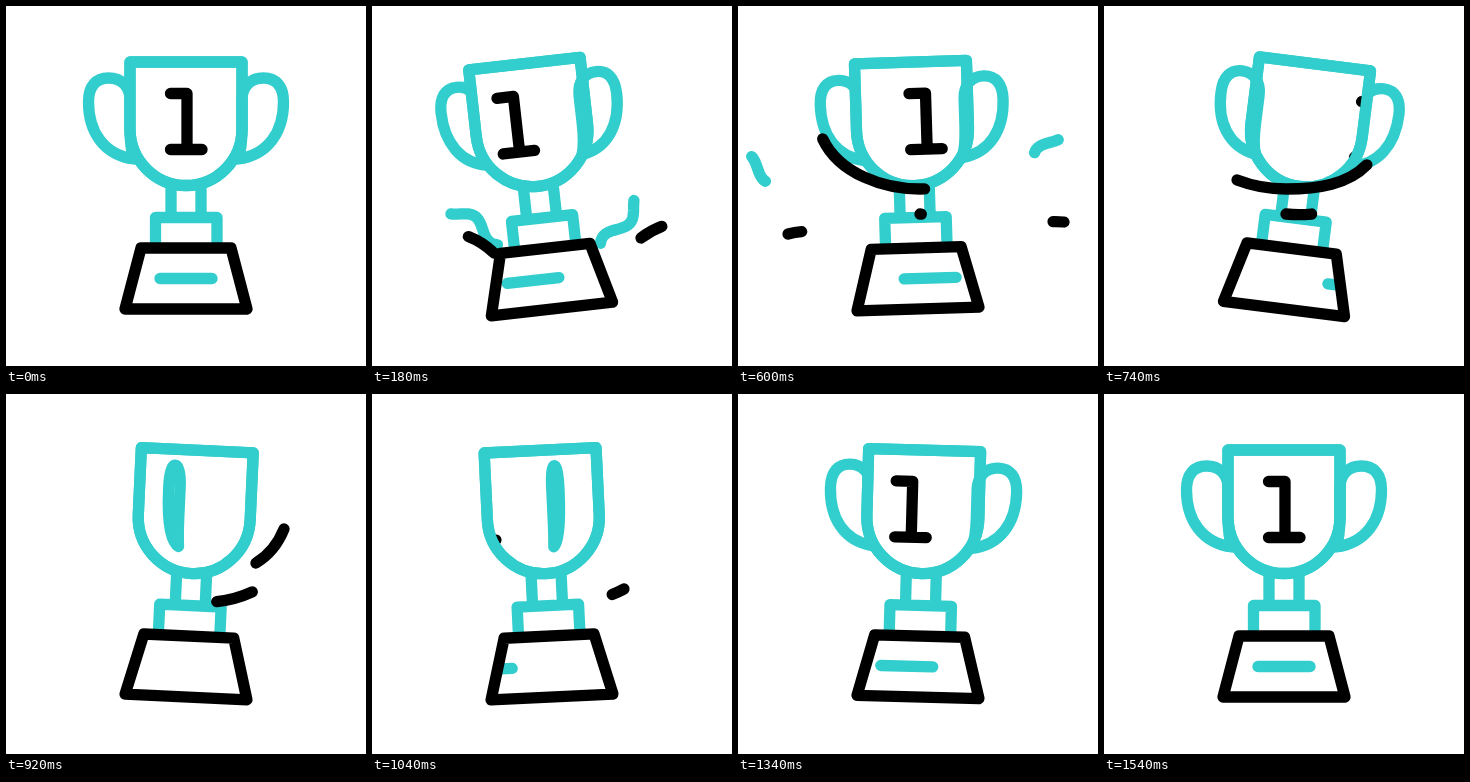
An HTML page that plays this animation: 360 px wide and 360 px high, repeating every 2.4 s.

```html
<!DOCTYPE html>
<html lang="en">
<head>
<meta charset="utf-8">
<title>Spinning trophy</title>
<style>
  html, body { margin: 0; width: 100%; height: 100%; overflow: hidden; background: #fff; }
  svg { display: block; width: 100vw; height: 100vh; }
  path { fill: none; stroke-width: 11.3; stroke-linecap: round; stroke-linejoin: round; }
  .teal { stroke: #32cdcd; }
  .black { stroke: #000; }
  .solid { fill: #fff; }
  .handle { vector-effect: non-scaling-stroke; }
</style>
</head>
<body>
<svg viewBox="0 0 360 360">
  <defs>
    <clipPath id="cupClip"><path d="M124 56H236V123A56 56.5 0 0 1 124 123Z"/></clipPath>
    <clipPath id="baseClip"><path d="M135 242H225L241 303H119Z"/></clipPath>
  </defs>
  <g id="sparks"></g>
  <g id="trophy">
    <g id="back"></g>
    <path class="teal" d="M165 180V211M195 180V211M149.5 240V211.5H211V240"/>
    <path class="teal solid" d="M124 56H236V123A56 56.5 0 0 1 124 123Z"/>
    <g clip-path="url(#cupClip)">
      <path id="digit" class="black" d="M164.5 87.5H181V143.5M164.5 143.5H196"/>
    </g>
    <path class="teal" d="M124 56H236V123A56 56.5 0 0 1 124 123Z"/>
    <g id="front"></g>
    <path class="solid" d="M135 242H225L241 303H119Z"/>
    <g clip-path="url(#baseClip)">
      <path id="label" class="teal" d="M154 272.5H206"/>
    </g>
    <path class="black" d="M135 242H225L241 303H119Z"/>
  </g>
  <g id="trails"></g>
</svg>
<script>
const LOOP = 2400, STEP = 20;
const $ = id => document.getElementById(id);

function addPath(parent, cls, d) {
  const el = document.createElementNS('http://www.w3.org/2000/svg', 'path');
  el.setAttribute('class', cls);
  el.setAttribute('d', d);
  parent.appendChild(el);
  return el;
}

// Eased track through [time, value] keys: flat at the ends and turning points
function track(...keys) {
  const last = keys.length - 1;
  const slope = i => (keys[i + 1][1] - keys[i][1]) / (keys[i + 1][0] - keys[i][0]);
  const tan = keys.map((_, i) => {
    if (i === 0 || i === last) return 0;
    const a = slope(i - 1), b = slope(i);
    return a * b <= 0 ? 0 : 2 * a * b / (a + b);
  });
  return t => {
    if (t <= keys[0][0]) return keys[0][1];
    if (t >= keys[last][0]) return keys[last][1];
    const i = keys.findIndex(k => k[0] > t) - 1;
    const [t0, v0] = keys[i], [t1, v1] = keys[i + 1];
    const h = t1 - t0, u = (t - t0) / h, w = 1 - u;
    return v0 * (1 + 2 * u) * w * w + v1 * u * u * (3 - 2 * u)
      + h * u * w * (tan[i] * w - tan[i + 1] * u);
  };
}

// Wind up, hold briefly, then swing back and spin half a turn
const tilt = track([0, 0], [350, -12.3], [420, -12.3], [765, 7.5], [1110, -4], [1250, 2], [1540, 0]);
const spin = track([0, 0], [350, -48], [420, -48], [920, 74], [1540, 180]);
const slideOut = track([0, 0], [350, -30], [420, -30], [860, 88]);
const slideIn = track([830, -84], [1500, 0]);

// Handle drawn around the cup axis at x = 0
const HANDLE = 'M52 153C82 149 97.5 126 97.5 96C97.5 80 90 72 77.5 72'
  + 'C65 72 56 80 56 94V122C56 134 55 145 52 153Z';
const handles = [-1, 1].map(side => ({ side, el: addPath($('front'), 'teal handle', HANDLE) }));

// Sine wave laid along a straight line
function wave([x0, y0], [x1, y1], period = 55, amp = 6.6, phase = -0.88) {
  const len = Math.hypot(x1 - x0, y1 - y0);
  const ux = (x1 - x0) / len, uy = (y1 - y0) / len;
  const pts = [];
  for (let s = 0; s <= len; s += 2) {
    const off = amp * Math.sin(2 * Math.PI * (s / period + phase));
    pts.push(`${x0 + ux * s + uy * off} ${y0 + uy * s - ux * off}`);
  }
  return 'M' + pts.join('L');
}

// A line that grows during `head` and is wiped away during `tail`
function stroke(parent, cls, head, tail, d) {
  const el = addPath(parent, cls, d);
  el.setAttribute('pathLength', 1);
  const ramp = ([from, to]) => track([from, 0], [to, 1]);
  return { el, head: ramp(head), tail: ramp(tail) };
}

const spark = (cls, d) => stroke($('sparks'), cls, [0, 420], [235, 735], d);
const trail = (head, tail, d) => stroke($('trails'), 'black', head, tail, d);
const strokes = [
  spark('teal', wave([128, 235], [9, 155])),
  spark('teal', wave([232, 240], [317, 130])),
  spark('black', 'M122 247C100 226 72 222 50 228'),
  spark('black', 'M269 232C286 219 305 214 326 216'),
  trail([325, 855], [560, 1060], 'M83 129C98 167 145 183 182 183C225 183 262 175 278 135'),
  trail([565, 1000], [745, 1150], 'M182 208C205 210 230 207 252 195')
];

function trim({ el, head, tail }, t) {
  const a = tail(t), len = head(t) - a;
  el.style.display = len > 0.01 ? '' : 'none';
  el.style.strokeDasharray = `${Math.max(len, 0)} 2`;
  el.style.strokeDashoffset = -a;
}

function draw(t) {
  $('trophy').setAttribute('transform', `rotate(${tilt(t)} 180 303)`);

  const angle = spin(t) * Math.PI / 180;
  const turn = Math.cos(angle);
  const nearSide = angle > 0 ? -1 : 1;
  for (const { side, el } of handles) {
    const layer = side === nearSide ? $('front') : $('back');
    if (el.parentNode !== layer) layer.appendChild(el);
    el.setAttribute('transform', `translate(180 0) scale(${side * turn || 0.001} 1)`);
  }

  const shift = `translate(${t < 880 ? slideOut(t) : slideIn(t)} 0)`;
  $('digit').setAttribute('transform', shift);
  $('label').setAttribute('transform', shift);

  strokes.forEach(s => trim(s, t));
}

const start = performance.now();
function tick() {
  const t = (performance.now() - start) % LOOP;
  draw(Math.floor(t / STEP) * STEP);
  requestAnimationFrame(tick);
}
tick();
</script>
</body>
</html>
```
